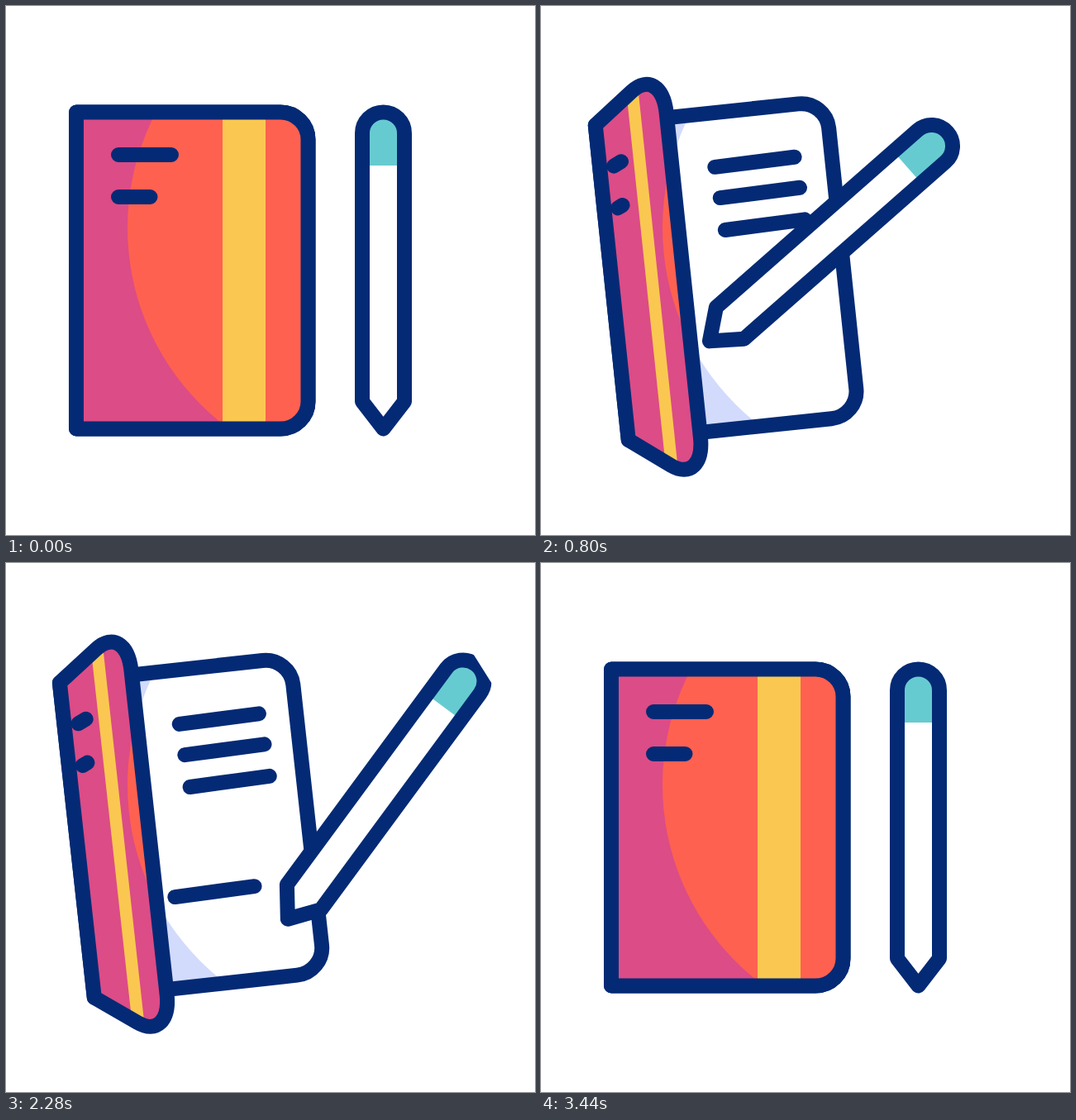
An HTML page for the animation above (4000 ms loop, 640 by 640 pixels).

```html
<!DOCTYPE html>
<html lang="en">
<head>
<meta charset="utf-8">
<title>Notebook and pen</title>
<style>
html, body { margin: 0; width: 100%; height: 100%; overflow: hidden; background: #fff; }
svg { display: block; width: 100vw; height: 100vh; }
.ink { fill: none; stroke: #042a75; stroke-width: 18; stroke-linecap: round; stroke-linejoin: round; }
</style>
</head>
<body>
<svg viewBox="0 0 640 640">
  <defs>
    <clipPath id="pageClip"><path id="pageShape"/></clipPath>
    <clipPath id="coverClip"><path id="coverShape"/></clipPath>
    <clipPath id="penClip"><path d="M0 0H496L899 640H0Z"/></clipPath>
  </defs>
  <g id="book">
    <g clip-path="url(#pageClip)">
      <rect x="60" y="40" width="340" height="560" fill="#d2dbfc"/>
      <circle class="light" cx="449" cy="268.5" r="302" fill="#fff"/>
    </g>
    <path id="pageLine" class="ink"/>
    <path class="ink" d="M223.5 194L320.5 192M226 231.7L323 229.5M228 271L325 268.5"/>
    <path id="written" class="ink"/>
    <g clip-path="url(#coverClip)">
      <rect x="60" y="40" width="340" height="560" fill="#dc4c86"/>
      <circle class="light" cx="449" cy="268.5" r="302" fill="#ff6150"/>
      <rect id="band" y="40" height="560" fill="#fac850"/>
    </g>
    <path id="label" class="ink"/>
    <path id="coverLine" class="ink"/>
  </g>
  <g clip-path="url(#penClip)">
    <g id="pen">
      <path d="M-25.5 158.5V-166a25.5 25.5 0 0 1 51 0V158.5L0 191.5Z" fill="#fff"/>
      <path d="M-25.5 -127V-166a25.5 25.5 0 0 1 51 0V-127Z" fill="#66cbd0"/>
      <path class="ink" d="M-25.5 158.5V-166a25.5 25.5 0 0 1 51 0V158.5L0 191.5Z"/>
    </g>
  </g>
</svg>
<script>
const LOOP = 4000, MID = 320, SPINE = 85, TOP = 128.5;
const $ = id => document.getElementById(id);
const lights = document.querySelectorAll('.light');

// Cover poses: edge end x,y | corner x,y | side start y | band x1,x2 | label 1 x1,x2,y2 | label 2 x1,x2,y2
const SHUT    = [332, 128.5, 365.5, 128.5, 161.5, 262, 314, 136, 200, 180, 136, 174.5, 231];
const AJAR    = [320, 120.4, 353, 119.2, 153, 253, 301, 136, 194, 178.3, 136, 170, 230];
const CLOSING = [200, 100.5, 236, 91.7, 132, 181, 209, 112.5, 140.5, 177.2, 112.6, 129.8, 229];
const OPENING = [190, 99.5, 227, 90, 131, 166, 191, 111.8, 137.5, 176.3, 112, 127, 228.8];
const OPEN    = [133, 92.5, 172, 63.5, 123, 126.5, 141, 102, 111.5, 175.5, 101.6, 107.5, 228.2];

const linear = u => u;
const sine = u => (1 - Math.cos(Math.PI * u)) / 2;
const sineIn = u => 1 - Math.cos(Math.PI * u / 2);
const quadOut = u => u * (2 - u);
const lerp = (a, b, u) => a + (b - a) * u;
const ramp = (t, a, b, ease = sine) => ease(Math.min(1, Math.max(0, (t - a) / (b - a))));
const blend = (a, b, u) => a.map((v, i) => lerp(v, b[i], u));

function coverPose(t) {
  if (t < 240) return blend(SHUT, OPENING, ramp(t, 20, 240, sineIn));
  if (t < 2260) return blend(OPENING, OPEN, ramp(t, 240, 540, quadOut));
  if (t < 2480) return blend(OPEN, CLOSING, ramp(t, 2260, 2480, sineIn));
  // d: how far the free edge is from shut
  let d;
  if (t < 2800) d = lerp(129.5, 12.5, ramp(t, 2480, 2800, linear));
  else if (t < 2840) d = 12.5 * (2840 - t) / 40;
  else {
    const u = ramp(t, 2840, 3400, linear);
    d = 101 * 4 * u * (1 - u);
  }
  return d < 12.5 ? blend(SHUT, AJAR, d / 12.5) : blend(AJAR, CLOSING, (d - 12.5) / 117);
}

function bookAngle(t) {
  if (t < 330) return 7.3 * ramp(t, 0, 330);
  if (t < 2240) return lerp(7.3, -6, ramp(t, 330, 560));
  if (t < 2480) return lerp(-6, -10, ramp(t, 2240, 2480));
  return -10 * (1 - ramp(t, 2480, 2800));
}

function penPose(t) {
  const rest = [456.5, MID, 0], start = [347.8, 279, 48.7], end = [450.8, 260, 48.7];
  if (t < 1120) return blend(rest, start, ramp(t, 440, 800));
  if (t < 2120) return blend(start, end, ramp(t, 1120, 1700));
  const e = ramp(t, 2120, 2600), pose = blend(end, rest, e);
  const swing = Math.sin(Math.PI * e * e);
  return [pose[0] + 11 * swing, pose[1] + 7 * swing, pose[2]];
}

// Mirror-symmetric board with two rounded free corners
function board([tx, ty, kx, ky, qy]) {
  const k = 0.55, flip = y => 2 * MID - y;
  const ax = lerp(tx, kx, k), ay = lerp(ty, ky, k), by = lerp(qy, ky, k);
  return `M${SPINE} ${TOP}L${tx} ${ty}C${ax} ${ay} ${kx} ${by} ${kx} ${qy}` +
    `V${flip(qy)}C${kx} ${flip(by)} ${ax} ${flip(ay)} ${tx} ${flip(ty)}L${SPINE} ${flip(TOP)}Z`;
}

function setShape(name, d) {
  $(name + 'Shape').setAttribute('d', d);
  $(name + 'Line').setAttribute('d', d);
}

function draw(t) {
  const angle = bookAngle(t), pose = coverPose(t);
  $('book').setAttribute('transform', `rotate(${angle} 225 ${MID})`);
  lights.forEach(c => c.setAttribute('transform', `rotate(${-angle} 225 ${MID})`));

  setShape('cover', board(pose));
  const [b1, b2, m1, m2, my, n1, n2, ny] = pose.slice(5);
  $('band').setAttribute('x', b1);
  $('band').setAttribute('width', b2 - b1);
  $('label').setAttribute('d', `M${m1} 180L${m2} ${my}M${n1} 231L${n2} ${ny}`);

  const w = ramp(t, 1120, 1700);
  $('written').setAttribute('d', w > 0 ? `M195.3 401.3L${lerp(195.3, 292.3, w)} ${lerp(401.3, 399, w)}` : '');

  const [x, y, a] = penPose(t);
  $('pen').setAttribute('transform', `translate(${x} ${y}) rotate(${a})`);
}

setShape('page', board(SHUT));
const began = performance.now();
function tick() {
  draw((performance.now() - began) % LOOP);
  requestAnimationFrame(tick);
}
tick();
</script>
</body>
</html>
```
